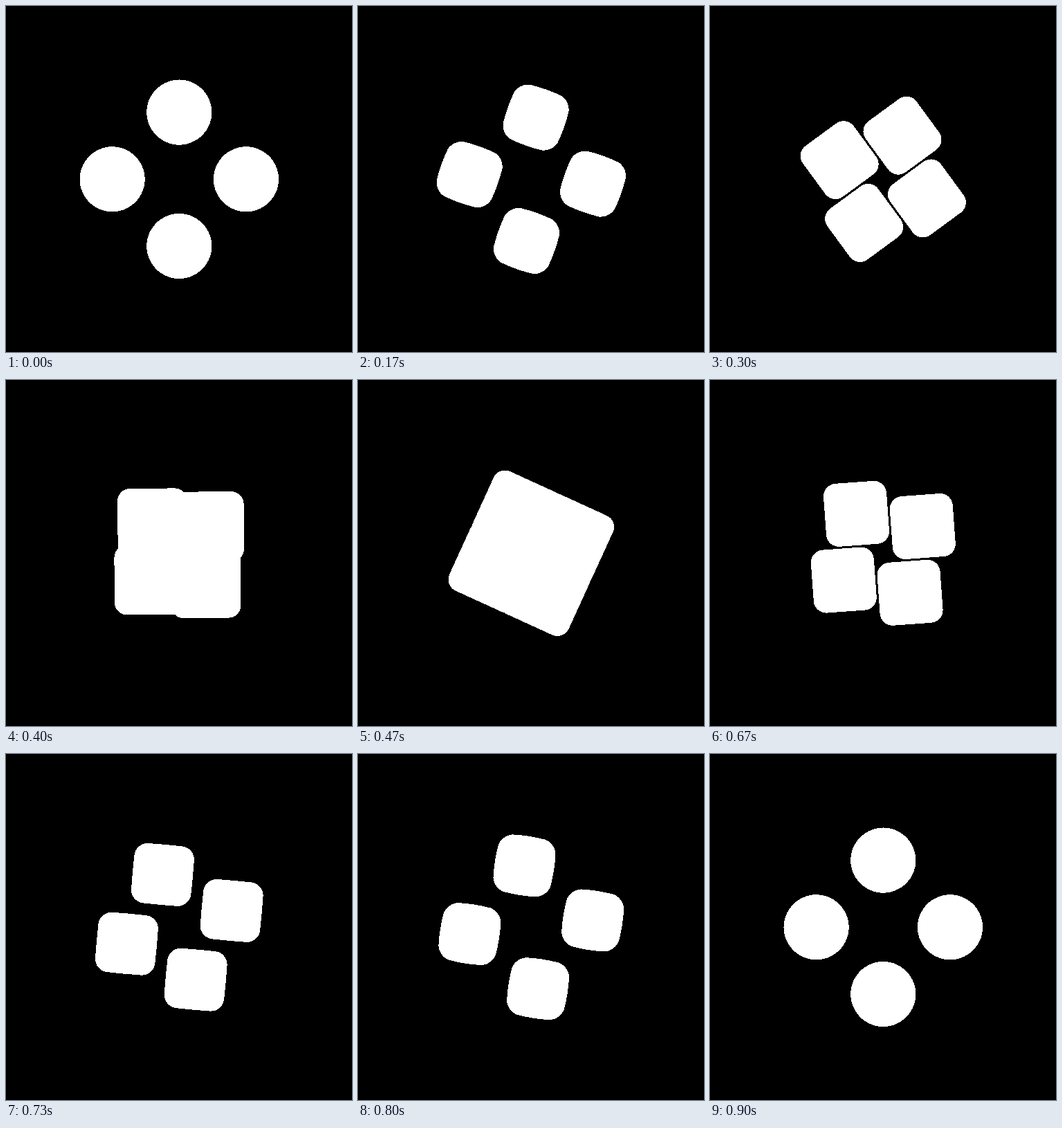
Animation of 500 by 500 pixels, one loop 1110 ms. Source, as an HTML page:

```html
<!DOCTYPE html>
<html lang="en">
<head>
<meta charset="utf-8">
<title>Four dots</title>
<style>
  html, body { margin: 0; width: 100%; height: 100%; overflow: hidden; background: #000; }
  svg { display: block; width: 100%; height: 100%; }
</style>
</head>
<body>
<svg viewBox="0 0 500 500" fill="#fff" shape-rendering="crispEdges">
  <path/><path/><path/><path/>
</svg>
<script>
const LOOP = 1110;
const CENTER = 250.3;
// Motion runs in ticks, 30 per second
const FIRST = 2, MIDDLE = 15.65, LAST = 27, MERGE = 11, GROW = 12;
const CORNER = 18;
const parts = [...document.querySelectorAll('path')];

const mix = (a, b, u) => a + (b - a) * u;
const clamp = u => Math.min(1, Math.max(0, u));
const smooth = u => u * u * (3 - 2 * u);

// Half a turn: quadratic ease in, then out
function orbitAt(n) {
  return n < MIDDLE
    ? 90 * clamp((n - FIRST) / (MIDDLE - FIRST)) ** 2
    : 180 - 90 * clamp((LAST - n) / (LAST - MIDDLE)) ** 2;
}

// Circle (round = 1) to square with round corners (round = 0)
function outline(half, round) {
  const flat = half - CORNER;
  const radius = mix(CORNER, 47.1, round);
  const bulge = 6.1 * round;
  const bow = bulge > 0.05 ? (flat * flat + bulge * bulge) / (2 * bulge) : 0;
  let d = `M${-flat} ${-half}`;
  let [x, y, p, q] = [flat, -half, half, -flat];
  for (let k = 0; k < 4; k++) {
    d += bow ? `A${bow} ${bow} 0 0 1 ${x} ${y}` : `L${x} ${y}`;
    d += `A${radius} ${radius} 0 0 1 ${p} ${q}`;
    [x, y, p, q] = [-y, x, -q, p];
  }
  return d + 'Z';
}

function draw(n) {
  const steps = Math.max(0, Math.min(n - FIRST, LAST - n));
  const merge = clamp(steps / MERGE);
  const dist = mix(96.7, 57, smooth(merge));
  const half = mix(41, 54.5, (steps / GROW) ** 2);
  const d = outline(half, (1 - merge) ** 5);
  const orbit = orbitAt(n);
  const twist = 45 - 41 * (1 - merge);
  parts.forEach((part, i) => {
    part.setAttribute('d', d);
    part.setAttribute('transform',
      `translate(${CENTER} ${CENTER}) rotate(${orbit + 90 * i}) translate(0 ${-dist}) rotate(${twist})`);
  });
}

const start = performance.now();
function frame() {
  const t = (performance.now() - start) % LOOP;
  // Tick boundaries fall on whole hundredths of a second
  draw(Math.floor(0.3 * Math.floor(t / 10) + 0.15));
  requestAnimationFrame(frame);
}
frame();
</script>
</body>
</html>
```
